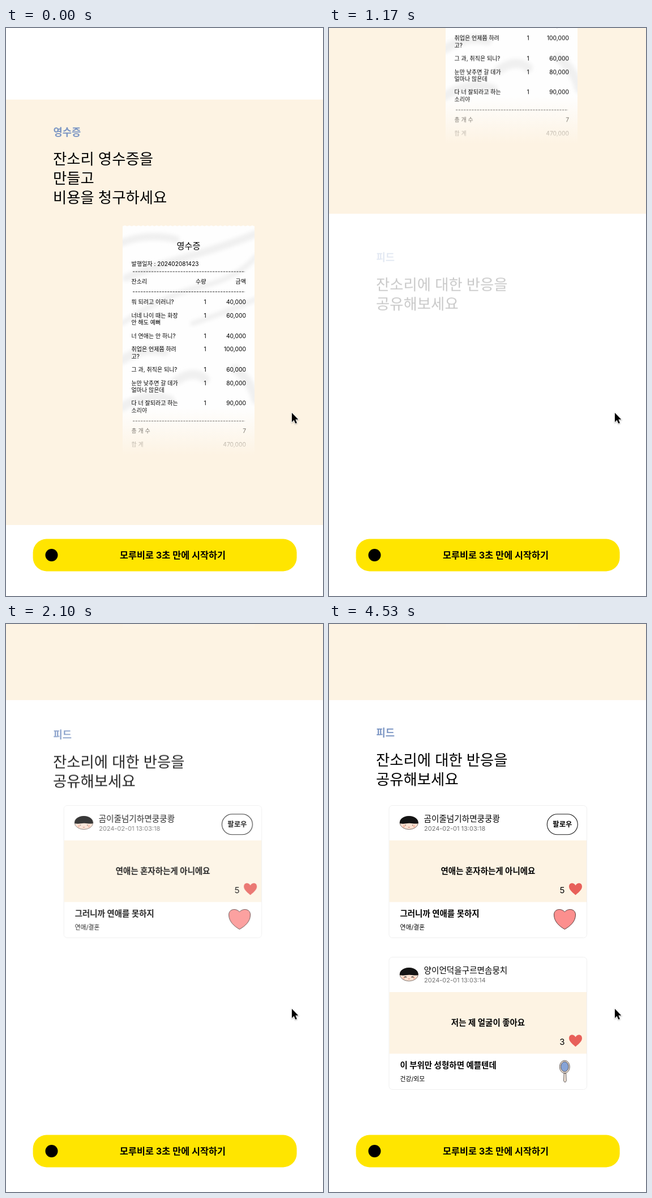
Animation of 560 by 1000 pixels, one loop 4560 ms. Source, as an HTML page:

```html
<!DOCTYPE html>
<html lang="ko">
<head>
<meta charset="utf-8">
<title>잔소리 영수증</title>
<style>
  :root { --cream: #fdf3e3; }
  html, body { margin: 0; width: 100%; height: 100%; overflow: hidden; background: #fff; }
  svg { display: block; width: 560px; height: 1000px; }
  text { font-family: Inter, "Noto Sans CJK KR", "Noto Sans CJK JP", "Noto Sans CJK", sans-serif; fill: #000; }
  stop { stop-color: var(--cream); }
  .cream { fill: var(--cream); }
  .bold { font-weight: 700; }
  .end { text-anchor: end; }
  .mid { text-anchor: middle; }
  .title { font-weight: 500; }
  .label { fill: #7c96c4; font-weight: 700; }
  .date { fill: #707070; }
  .dash { stroke: #222; stroke-width: .9; stroke-dasharray: 3.3 1.4; }
</style>
</head>
<body>
<svg id="stage" viewBox="0 0 560 1000">
  <defs>
    <linearGradient id="fade" x1="0" y1="0" x2="0" y2="1">
      <stop offset="0" stop-opacity="0"/>
      <stop offset="1"/>
    </linearGradient>
    <clipPath id="paper"><path id="paperEdge"/></clipPath>
    <filter id="soft"><feGaussianBlur stdDeviation="3"/></filter>
    <path id="heart" d="M0 10.5C-3 7.5-11.5 2-11.5-4.5C-11.5-12-3-12.5 0-6.5C3-12.5 11.5-12 11.5-4.5C11.5 2 3 7.5 0 10.5Z"/>
    <g id="head">
      <ellipse rx="16.2" ry="11.6" fill="#fce3d3" stroke="#4a3d38" stroke-width=".7"/>
      <path d="M-16.4 1C-17-7-9-12 0-12S17-7 16.4 1C10 2.6 6 .5 0 .8S-10 2.6-16.4 1Z" fill="#141414"/>
      <g fill="#f6b9a4"><circle cx="-9" cy="6" r="2"/><circle cx="9" cy="6" r="2"/></g>
      <path d="M-1.5 7.6Q0 8.6 1.5 7.6" fill="none" stroke="#b5584c" stroke-width=".9"/>
    </g>
  </defs>
  <g id="page"></g>
  <g id="overlay"></g>
</svg>
<script>
const LOOP = 4560, SCROLL = 741;
const $ = id => document.getElementById(id);

const text = (x, y, size, str, cls = '') =>
  `<text x="${x}" y="${y}" font-size="${size}" class="${cls}">${str}</text>`;
const lines = (x, y, size, step, rows, cls) =>
  rows.map((row, i) => text(x, y + i * step, size, row, cls)).join('');
const dash = y => `<path class="dash" d="M224 ${y}H422"/>`;

function receiptRows() {
  const items = [
    ['뭐 되려고 이러니?', '40,000'],
    ['너네 나이 때는 화장|안 해도 예뻐', '60,000'],
    ['너 연애는 안 하니?', '40,000'],
    ['취업은 언제쯤 하려|고?', '100,000'],
    ['그 과, 취직은 되니?', '60,000'],
    ['눈만 낮추면 갈 데가|얼마나 많은데', '80,000'],
    ['다 너 잘되라고 하는|소리야', '90,000'],
  ];
  let y = 486.2;
  return items.map(([name, price]) => {
    const rows = name.split('|');
    const out = lines(221.6, y, 10, 12.4, rows) +
      text(353.6, y, 10.3, '1', 'end') + text(424, y, 10.3, price, 'end');
    y += 23.5 + (rows.length - 1) * 12.4;
    return out;
  }).join('');
}

const receipt = `
  <rect class="cream" y="126" width="560" height="749"/>
  ${text(83.5, 190.4, 17.7, '영수증', 'label')}
  ${lines(83, 240.2, 26.4, 34, ['잔소리 영수증을', '만들고', '비용을 청구하세요'], 'title')}
  <g clip-path="url(#paper)">
    <rect x="206" y="347" width="233" height="404" fill="#fefefe"/>
    <g filter="url(#soft)" fill="none" stroke="#f0f0f0" stroke-linecap="round">
      <path stroke-width="13" d="M204 378Q250 360 300 372M212 440Q260 420 330 400T442 362"/>
      <path stroke-width="9" d="M205 520Q280 470 345 455T442 402M330 520Q390 500 440 478"/>
      <path stroke-width="16" d="M204 585Q245 560 280 570M300 622Q330 600 352 618M204 668Q250 640 290 655M405 600Q432 620 442 655"/>
    </g>
  </g>
  ${text(322.5, 388.6, 15.2, '영수증', 'mid')}
  ${text(221.6, 419.3, 10.1, '발행일자 : 202402081423')}
  ${dash(429)}
  ${text(221.6, 450.2, 10, '잔소리')}
  ${text(353.4, 450.2, 10, '수량', 'end')}
  ${text(424, 450.2, 10, '금액', 'end')}
  ${dash(464.5)}
  ${receiptRows()}
  ${dash(692)}
  ${text(221.6, 713.3, 10, '총 개 수')}${text(424, 713.3, 10.3, '7', 'end')}
  ${text(221.6, 736.9, 10, '합 계')}${text(424, 736.9, 10.3, '470,000', 'end')}
  <rect x="204" y="668" width="238" height="84" fill="url(#fade)"/>`;

const card = (id, y, c) => `
  <g id="${id}"><g transform="translate(0 ${y})">
    <rect x="106" y="319.5" width="349.5" height="233" rx="6" fill="#fff" stroke="#efefef"/>
    <rect class="cream" x="106.5" y="381" width="348.5" height="108.5"/>
    <use href="#head" x="141.3" y="350"/>
    <path d="${c.eyes}" fill="none" stroke="#222" stroke-width="1.3" stroke-linecap="round"/>
    ${text(167.6, 348.4, 14.6, c.user)}
    ${text(168, 364, 11, c.date, 'date')}
    ${text(281, 440.4, 14.5, c.quote, 'bold mid')}
    ${text(416.5, 473.6, 15, c.likes, 'end')}
    <use href="#heart" x="435.5" y="466.8" fill="#e8605a"/>
    ${text(125.4, 515.4, 14.5, c.nag, 'bold')}
    ${text(125.6, 538, 10.8, c.topic)}
    ${c.art}
  </g></g>`;

const feed = `
  <g transform="translate(0 ${SCROLL})">
    <g id="heading">
      ${text(83.5, 198.4, 17.7, '피드', 'label')}
      ${lines(83, 249, 26.4, 34, ['잔소리에 대한 반응을', '공유해보세요'], 'title')}
    </g>
    ${card('card1', 0, {
      eyes: 'M135 354.2h.1M147.6 354.2h.1',
      user: '곰이줄넘기하면쿵쿵쾅', date: '2024-02-01 13:03:18',
      quote: '연애는 혼자하는게 아니에요', likes: 5,
      nag: '그러니까 연애를 못하지', topic: '연애/결혼',
      art: `<rect x="385.3" y="334.8" width="54" height="36" rx="18" fill="#fff" stroke="#1c1c1c" stroke-width="1.1"/>
        ${text(412.3, 357, 12.3, '팔로우', 'bold mid')}
        <path d="M416.3 537.5C407 532 397.5 524 397.5 512C397.5 501 411 500 416.3 507C422 500 435.5 501 435.5 512C435.5 524 426 532 416.3 537.5Z" fill="#fc8f8e" stroke="#59403f"/>`,
    })}
    ${card('card2', 267, {
      eyes: 'M133.5 354.6q1.5-1 3 0M146 354.6q1.5-1 3 0',
      user: '양이언덕을구르면솜뭉치', date: '2024-02-01 13:03:14',
      quote: '저는 제 얼굴이 좋아요', likes: 3,
      nag: '이 부위만 성형하면 예쁠텐데', topic: '건강/외모',
      art: `<g fill="#f6e9dc" stroke="#4b4543" stroke-width=".9">
          <path d="M415.2 524L414.6 537Q416.9 542.5 419.2 537L418.6 524Z"/>
          <ellipse cx="416.3" cy="512.6" rx="9" ry="11.2"/>
          <ellipse cx="416.3" cy="512.4" rx="6.8" ry="8.8" fill="#86a3d6"/>
        </g>`,
    })}
  </g>`;

// Receipt paper with a finely toothed top edge
const teeth = 29, tooth = 233 / teeth / 2;
$('paperEdge').setAttribute('d', `M206 349${`l${tooth}-1.6l${tooth} 1.6`.repeat(teeth)}V751H206Z`);

$('page').innerHTML = receipt + feed;
$('overlay').innerHTML = `
  <rect x="47.6" y="899.6" width="466" height="56.8" rx="24" fill="#ffe500"/>
  <circle cx="80.5" cy="928" r="11" fill="#000"/>
  ${text(294.5, 934.4, 16.3, '모루비로 3초 만에 시작하기', 'bold mid')}
  <path d="M505 677.5V693.7L508.7 690.3L511.3 696.3L513.9 695.2L511.3 689.3H516.3Z" stroke="#fff" stroke-width="1.6" paint-order="stroke"
    style="filter:drop-shadow(0 1px 1px rgba(0,0,0,.3))"/>`;

// Each step: [time in ms, styles, easing to the next step]
function play(id, steps) {
  const frames = steps.map(([ms, style, easing = 'linear']) => ({ offset: ms / LOOP, easing, ...style }));
  frames.unshift({ ...frames[0], offset: 0, easing: 'linear' });
  frames.push({ ...frames[frames.length - 1], offset: 1 });
  $(id).animate(frames, { duration: LOOP, iterations: Infinity });
}
const shift = (x, y) => ({ transform: `translate(${x}px, ${y}px)` });
const hidden = { opacity: 0 }, shown = { opacity: 1 };

play('page', [
  [570, shift(0, 0), 'cubic-bezier(.333, 0, .667, .18)'],
  [870, shift(0, -115.5), 'cubic-bezier(.333, .22, .667, .733)'],
  [1170, shift(0, -546.5), 'cubic-bezier(.333, .72, .667, .98)'],
  [1530, shift(0, -739)],
  [1650, shift(0, -SCROLL)],
]);
play('heading', [
  [865, { ...shift(0, 24), ...hidden }],
  [2300, { ...shift(0, 0), ...shown }],
]);
play('card1', [
  [1260, { ...shift(-24, 0), ...hidden }],
  [2260, { ...shift(0, 0), ...shown }],
]);
// The second card pops in part-way through its slide.
play('card2', [
  [2510, { ...shift(-18, 0), ...hidden }],
  [2510, { ...shift(-18, 0), opacity: .25 }],
  [3260, { ...shift(0, 0), ...shown }],
]);
</script>
</body>
</html>
```
